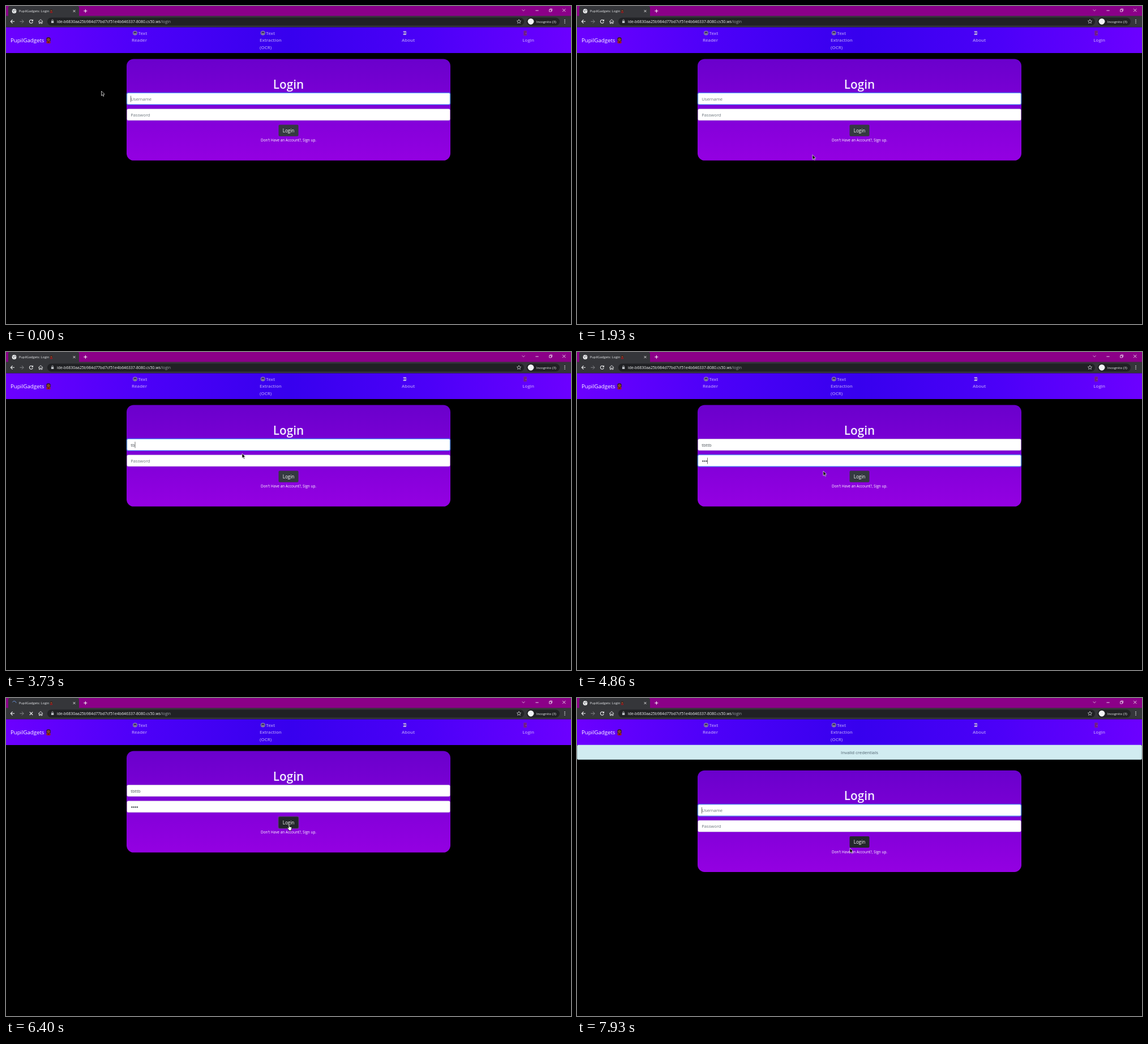
Recreate the animation shown at these times as an HTML page with a canvas. Size 998 by 561 pixels, loop 8000 ms.

```html
<!DOCTYPE html>
<html lang="en">
<head>
<meta charset="utf-8">
<title>Login</title>
<style>
html, body { margin: 0; width: 100%; height: 100%; overflow: hidden; background: #000; }
canvas { display: block; width: 998px; height: 561px; }
</style>
</head>
<body>
<canvas id="stage"></canvas>
<script>
const W = 998, H = 561, LOOP = 8000;
const CLICK = 5830, LOADED = 6460, SHIFT = 34.3;
const BRAND = "PupilGadgets", USER = "tbttb";
const USER_KEYS = [3460, 3640, 3800, 3930, 4060];
const PASS_KEYS = [4460, 4600, 4740, 4930];
const PASS_FOCUS = 4200;

// Pointer path: time, x, y of the tip
const PATH = [
  [0, 168.5, 150], [460, 168.5, 150], [860, 205, 253], [1060, 205, 253],
  [1500, 330, 287], [1860, 416, 262.5], [2060, 416, 262.5], [2300, 424, 267],
  [2660, 424, 230], [2860, 424, 230], [3260, 417, 179], [4260, 417, 179],
  [4800, 435, 210], [5060, 435, 210], [5660, 500, 223], [7700, 500, 223], [7930, 482, 265]
];

const canvas = document.getElementById("stage");
const ctx = canvas.getContext("2d");
const dpr = window.devicePixelRatio || 1;
canvas.width = W * dpr;
canvas.height = H * dpr;

const clamp = v => Math.max(0, Math.min(1, v));
const count = (keys, t) => keys.filter(k => t >= k).length;

function rect(x, y, w, h, color) {
  ctx.fillStyle = color;
  ctx.fillRect(x, y, w, h);
}

function round(x, y, w, h, r, fill, stroke, line = 0.6) {
  ctx.beginPath();
  ctx.roundRect(x, y, w, h, r);
  if (fill) { ctx.fillStyle = fill; ctx.fill(); }
  if (stroke) { ctx.strokeStyle = stroke; ctx.lineWidth = line; ctx.stroke(); }
}

function disc(x, y, r, color) {
  ctx.fillStyle = color;
  ctx.beginPath();
  ctx.arc(x, y, r, 0, Math.PI * 2);
  ctx.fill();
}

function arc(x, y, r, from, to, color, line) {
  ctx.strokeStyle = color;
  ctx.lineWidth = line;
  ctx.beginPath();
  ctx.arc(x, y, r, from, to);
  ctx.stroke();
}

function path(d, x, y, stroke, line, fill) {
  const p = new Path2D(d);
  ctx.save();
  ctx.translate(x, y);
  ctx.lineJoin = "round";
  if (fill) { ctx.fillStyle = fill; ctx.fill(p); }
  if (stroke) { ctx.strokeStyle = stroke; ctx.lineWidth = line; ctx.stroke(p); }
  ctx.restore();
}

function text(str, x, y, size, color, align = "left", weight = 400) {
  ctx.font = `${weight} ${size}px "Open Sans", "Noto Sans", sans-serif`;
  ctx.textAlign = align;
  ctx.fillStyle = color;
  ctx.fillText(str, x, y);
  return ctx.measureText(str).width;
}

function gradient(x1, y1, x2, y2, ...colors) {
  const g = ctx.createLinearGradient(x1, y1, x2, y2);
  colors.forEach((c, i) => g.addColorStop(i / (colors.length - 1), c));
  return g;
}

function student(x, y, s) {
  ctx.save();
  ctx.translate(x, y);
  ctx.scale(s, s);
  round(-3.5, -5, 7, 7.5, 3, "#2b1712");
  disc(0, -1, 2.7, "#80452d");
  round(-3.5, 1.6, 7, 3.8, 1.6, "#9e1b24");
  rect(-0.8, 1.6, 1.6, 2.6, "#44201a");
  ctx.restore();
}

function drawBrowser(t) {
  const loading = t >= CLICK && t < LOADED;
  rect(0, 0, W, 18, "#8b0088");
  rect(0, 17.5, W, 20, "#35363a");
  round(4, 0, 125, 18, [3, 3, 0, 0], "#35363a");

  if (loading) {
    const a = (t - CLICK) / 160;
    arc(14.5, 9, 3.5, a, a + 2.6, "#6e9ae8", 0.9);
  } else {
    disc(14.5, 9, 3.9, "#f1f3f4");
    path("M-2.8 -1.4L-.6 -.6L-1 1L.3 2.6M.4 -3L1 -1.2L3 -.4", 14.5, 9, "#55575b", 0.9);
  }
  text(BRAND + ": Login", 22.8, 11.1, 5.8, "#e8eaed");
  student(80, 8.9, 0.6);
  path("M-1.9 -1.9L1.9 1.9M1.9 -1.9L-1.9 1.9", 120.5, 9, "#eee", 0.9);
  path("M-3 0H3M0 -3V3", 140.3, 8.8, "#fff", 1);

  path("M-2.5 -1.2L0 1.2L2.5 -1.2", 914, 7.5, "#e6c8e5", 0.8);
  path("M-2.6 0H2.6", 938, 8, "#fff", 0.8);
  path("M-2.4 -1.2H1.3V2.5H-2.4ZM-1.2 -1.2V-2.5H2.5V1.2H1.3", 962, 7.5, "#fff", 0.7);
  path("M-2.6 -2.6L2.6 2.6M2.6 -2.6L-2.6 2.6", 985.7, 7.5, "#fff", 0.8);

  const arrow = "M3.5 0H-3M0 -3.2L-3.2 0L0 3.2";
  path(arrow, 11.5, 27.3, "#f0f1f2", 1.1);
  path("M-3.5 0H3M0 -3.2L3.2 0L0 3.2", 28, 27.3, "#85868a", 1);
  if (loading) {
    path("M-2.7 -2.7L2.7 2.7M2.7 -2.7L-2.7 2.7", 44.5, 27.3, "#f0f1f2", 1.1);
  } else {
    arc(44.4, 27.3, 3, 0.3, 5.5, "#f0f1f2", 1.1);
    path("M3.6 -3.8V-.5H.3Z", 44.4, 27.3, null, 0, "#f0f1f2");
  }
  path("M-4 .2L0 -3.5L4 .2M-2.7 -.6V3.5H-.9V1H.9V3.5H2.7V-.6", 61.2, 27.3, "#f0f1f2", 0.9);

  round(73, 20.5, 842, 14, 7, "#202124");
  round(79.9, 26.2, 4.4, 3.7, 0.5, "#bdc1c6");
  path("M-1.2 0V-1.2A1.2 1.2 0 0 1 1.2 -1.2V0", 82.1, 26.3, "#bdc1c6", 0.7);
  const w = text("ide-b6830aa25b984d77bd7cf51e4b646337-8080.cs50.ws", 90, 29.6, 6.93, "#f1f3f4");
  text("/login", 90 + w, 29.6, 6.93, "#9aa0a6");
  path("M0 -3.7L1.1 -1.2L3.6 -1L1.7 .7L2.3 3.2L0 1.9L-2.3 3.2L-1.7 .7L-3.6 -1L-1.1 -1.2Z",
    906, 27.3, "#dcdee1", 0.7);
  round(919.5, 20.5, 58.5, 14, 7, "#202124");
  disc(927, 27.3, 5.4, "#f1f3f4");
  text("Incognito (3)", 936.8, 29.5, 6.07, "#f1f3f4");
  for (let i = -1; i <= 1; i++) disc(987, 27.3 + i * 2.7, 0.8, "#f1f3f4");
}

function shieldIcon(x) {
  round(x - 3.6, 44.2, 7.2, 7, 3, "#675c86", "#a39ccd", 0.7);
  rect(x - 2.3, 45.8, 4.6, 1.7, "#38255f");
  rect(x - 1.3, 48.8, 2.6, 0.8, "#c4b9dd");
}

function drawNav() {
  rect(0, 37.5, W, 45.5, gradient(0, 0, W, 0, "#6c00ff", "#4c00f8", "#3700ee", "#4c00f8", "#6c00ff"));
  text(BRAND, 8, 64, 9.65, "#fff");
  student(75, 60.4, 1.05);
  const link = (str, x, row) =>
    text(str, x, 50.7 + row * 12.4, 7.9, "rgba(255,255,255,.57)", "left", 600);
  shieldIcon(228);
  link("Text", 233.5, 0);
  link("Reader", 222, 1);
  shieldIcon(453.8);
  link("Text", 459.3, 0);
  link("Extraction", 448, 1);
  link("(OCR)", 448, 2);
  for (let i = 0; i < 3; i++) round(701.6 + i % 2 * 0.7, 44.4 + i * 2.4, 5.4, 1.7, 0.4, i === 1 ? "#9a91bb" : "#d0c6e4");
  link("About", 699, 1);
  round(914.6, 43.8, 5, 8.2, 0.4, "#6d1d86", "#8a2a86", 0.5);
  disc(918.4, 48.2, 0.5, "#c59bd0");
  link("Login", 912.3, 1);
}

function drawInput(y, focus) {
  const x = 213.8, w = 570.4, h = 20;
  if (focus > 0) {
    ctx.globalAlpha = focus;
    round(x - 1.5, y - 1.5, w + 3, h + 3, 3, "rgba(0,123,255,.3)");
    ctx.globalAlpha = 1;
  }
  round(x, y, w, h, 2, "#fff", "#ced4da", 0.6);
  if (focus > 0) {
    ctx.globalAlpha = focus;
    round(x, y, w, h, 2, null, "#6aaeff", 0.9);
    ctx.globalAlpha = 1;
  }
}

function caretOn(t) {
  const blink = since => Math.floor((t - since) / 535) % 2 === 0;
  if (t >= LOADED) return blink(LOADED);
  if (t >= CLICK) return false;
  if (t >= PASS_KEYS[3]) return blink(PASS_KEYS[3]);
  return t >= USER_KEYS[0] || Math.floor(t / 530) % 2 === 0;
}

function drawForm(t) {
  const fresh = t >= LOADED;
  const fade = at => clamp((t - at) / 150);
  const userFocus = fresh ? fade(LOADED) : 1 - fade(PASS_FOCUS);
  const passFocus = fresh ? 0 : fade(PASS_FOCUS) * (1 - fade(CLICK));
  const typed = fresh ? 0 : count(USER_KEYS, t);
  const dots = fresh ? 0 : count(PASS_KEYS, t);
  const inPass = !fresh && t >= PASS_FOCUS;
  let userEnd = 0;

  ctx.save();
  if (fresh) {
    round(0.3, 83, W - 0.6, 25.6, 2, "#d1ecf1", "#bee5eb", 0.6);
    text("Invalid credentials", 499, 99, 7.8, "#4c606d", "center");
    ctx.translate(0, SHIFT);
  }
  round(213, 93.4, 572, 179.2, 12.5, gradient(0, 93, 0, 273, "#6a00cc", "#9400e2"));
  text("Login", 499, 145.6, 20.7, "#f5efff", "center", 600);

  drawInput(153.6, userFocus);
  drawInput(181.7, passFocus);
  if (typed) userEnd = text(USER.slice(0, typed), 220.2, 166.9, 7.7, "#495057");
  else text("Username", 220.2, 166.9, 7.65, "#6c757d");
  for (let i = 0; i < dots; i++) disc(222.3 + i * 3.2, 192.5, 1.2, "#495057");
  if (!dots) text("Password", 220.2, 195, 7.65, "#6c757d");
  if (caretOn(t)) {
    if (inPass) rect(220.3 + dots * 3.3, 186.5, 0.7, 11, "#333");
    else rect(220.2 + userEnd, 158.4, 0.7, 11, "#333");
  }

  const hover = fresh ? Math.max(1 - fade(LOADED), fade(7780)) : fade(5570);
  const mix = (a, b) => Math.round(a + (b - a) * hover);
  if (t >= CLICK && !fresh) round(480.4, 208.4, 37.2, 22.4, 3, "rgba(82,88,93,.65)");
  round(481.5, 209.6, 35, 20.2, 2, `rgb(${mix(52, 35)},${mix(58, 39)},${mix(64, 43)})`);
  text("Login", 499, 222.8, 8.15, "#fff", "center");
  text("Don't Have an Account?, Sign up.", 499, 239.3, 6.45, "#fff", "center");
  ctx.restore();
}

function pointerAt(t) {
  let i = 1;
  while (i < PATH.length - 1 && t > PATH[i][0]) i++;
  const [t0, x0, y0] = PATH[i - 1], [t1, x1, y1] = PATH[i];
  const u = clamp((t - t0) / (t1 - t0));
  const k = u * u * (3 - 2 * u);
  return [x0 + (x1 - x0) * k, y0 + (y1 - y0) * k];
}

function drawPointer(t) {
  const [x, y] = pointerAt(t);
  const top = t >= LOADED ? SHIFT : 0;
  const inside = (l, a, r, b) => x >= l && x <= r && y >= a + top && y <= b + top;
  const overField = inside(214, 153.6, 784, 173.6) || inside(214, 181.7, 784, 201.7);
  const resting = t >= LOADED && t <= 7730;

  if (resting || inside(481.5, 209.6, 516.5, 229.8)) {
    path("M-.9 .7Q0 -.4 .9 .7V4L3.6 4.6Q4.9 5 4.7 6.3L4 9.3V10.8H-.6V9.6L-3 6.6Q-3.2 5.2 -1.9 5.6L-.9 6.5Z",
      x, y, "#111", 0.8, "#fff");
  } else if (overField) {
    path("M-1.5 -4.5H1.5M0 -4.5V4.5M-1.5 4.5H1.5", x, y, "#222", 0.7);
  } else {
    path("M0 0V8.2L1.9 6.5L3.2 9.4L4.5 8.8L3.2 6L5.7 5.8Z", x, y, "#ddd", 0.8, "#000");
  }
}

function draw(t) {
  ctx.setTransform(dpr, 0, 0, dpr, 0, 0);
  rect(0, 0, W, H, "#000");
  drawBrowser(t);
  drawNav();
  drawForm(t);
  drawPointer(t);
}

const start = performance.now();
function tick() {
  draw((performance.now() - start) % LOOP);
  requestAnimationFrame(tick);
}
tick();
</script>
</body>
</html>
```
